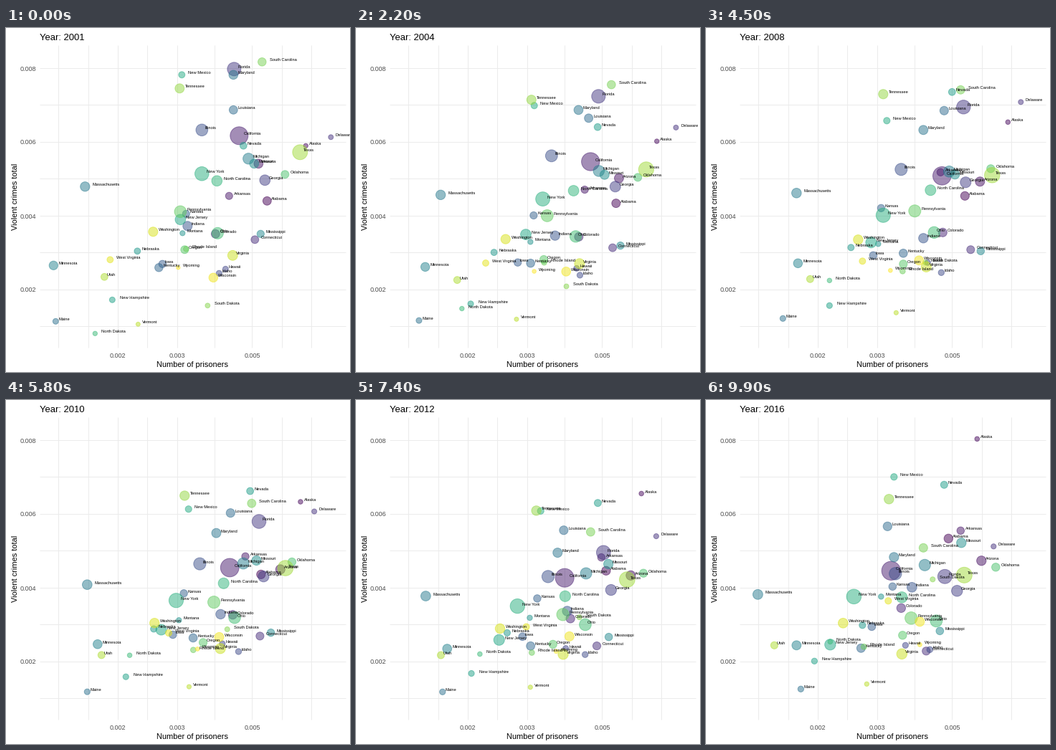
These frames come from a looping animation (480 by 480 pixels, 10000 ms). A matplotlib script:

```python
import numpy as np
import matplotlib.pyplot as plt
from matplotlib.animation import FuncAnimation

SIZE, DPI, FRAMES, STEP = 480, 72, 100, 100
LEFT, RIGHT, TOP, BOTTOM = 47, 474, 24, 446
GRID, TICK = "#EBEBEB", "#4D4D4D"
MIDDLE, LAST = 45, FRAMES - 1

plt.rcParams["font.family"] = "Liberation Sans"
names, people, paths = [], [], []


def state(name, millions, start, middle, end):
    """Register a bubble by its population and three points of its path."""
    names.append(name)
    people.append(millions)
    paths.append((start, middle, end))


state("Alabama", 4.5, (364, 241), (361, 234), (338, 193))
state("Alaska", .64, (418, 164), (421, 131), (378, 54))
state("Arizona", 5.6, (352, 189), (382, 214), (384, 224))
state("Arkansas", 2.7, (311, 234), (327, 201), (355, 182))
state("California", 34.5, (325, 150), (329, 206), (258, 238))
state("Colorado", 4.5, (292, 287), (330, 285), (272, 290))
state("Connecticut", 3.4, (347, 295), (369, 309), (307, 350))
state("Delaware", .8, (453, 152), (439, 103), (401, 204))
state("Florida", 17, (318, 57), (359, 110), (333, 246))
state("Georgia", 8.6, (361, 212), (362, 215), (350, 266))
state("Hawaii", 1.2, (306, 336), (309, 327), (278, 342))
state("Idaho", 1.35, (297, 342), (328, 341), (312, 348))
state("Illinois", 12, (273, 142), (272, 197), (264, 242))
state("Indiana", 6, (253, 276), (303, 293), (287, 261))
state("Iowa", 2.9, (218, 329), (233, 317), (231, 316))
state("Kansas", 2.7, (251, 259), (244, 251), (260, 260))
state("Kentucky", 4, (213, 334), (275, 314), (216, 346))
state("Louisiana", 4.4, (317, 114), (332, 115), (253, 176))
state("Maine", 1.25, (69, 409), (107, 405), (132, 403))
state("Maryland", 5.4, (317, 65), (303, 142), (262, 219))
state("Massachusetts", 6.3, (110, 221), (126, 230), (72, 271))
state("Michigan", 9.6, (338, 182), (339, 200), (305, 230))
state("Minnesota", 5, (66, 331), (128, 328), (126, 342))
state("Mississippi", 2.8, (355, 287), (383, 311), (326, 322))
state("Missouri", 5.6, (346, 189), (347, 204), (356, 199))
state("Montana", .91, (246, 286), (240, 301), (244, 274))
state("Nebraska", 1.7, (183, 311), (202, 306), (218, 314))
state("Nevada", 2.3, (331, 164), (343, 89), (332, 118))
state("New Hampshire", 1.24, (148, 379), (172, 387), (151, 364))
state("New Jersey", 8.3, (243, 267), (230, 299), (173, 341))
state("New Mexico", 1.8, (245, 65), (252, 129), (262, 107))
state("New York", 18.5, (273, 203), (247, 261), (206, 274))
state("North Carolina", 8.4, (294, 213), (313, 226), (273, 275))
state("North Dakota", .64, (124, 426), (172, 352), (173, 337))
state("Ohio", 10.9, (295, 286), (318, 285), (321, 308))
state("Oklahoma", 3.5, (389, 204), (397, 196), (404, 233))
state("Oregon", 3.5, (249, 309), (275, 329), (274, 328))
state("Pennsylvania", 12, (243, 256), (291, 255), (286, 304))
state("Rhode Island", 1.03, (251, 308), (274, 339), (220, 344))
state("South Carolina", 4.1, (357, 47), (355, 86), (303, 206))
state("South Dakota", .76, (281, 387), (306, 327), (316, 250))
state("Tennessee", 5.8, (242, 84), (247, 92), (255, 138))
state("Texas", 22, (410, 173), (399, 205), (360, 244))
state("Utah", 2.4, (137, 347), (145, 350), (95, 342))
state("Vermont", .56, (184, 413), (265, 397), (224, 396))
state("Virginia", 7.2, (316, 317), (307, 333), (273, 354))
state("Washington", 6, (205, 284), (212, 295), (191, 311))
state("West Virginia", 1.7, (145, 323), (218, 325), (254, 280))
state("Wisconsin", 5.3, (289, 348), (297, 324), (298, 309))
state("Wyoming", .5, (240, 334), (257, 338), (298, 341))

people = np.array(people)
start, middle, end = np.array(paths).transpose(1, 0, 2) + 0.3
GAP = names.index("New York")  # has no figures for 2014-2015

fig = plt.figure(figsize=(SIZE / DPI, SIZE / DPI), dpi=DPI, facecolor="white")
ax = fig.add_axes([0, 0, 1, 1])
ax.set(xlim=(0, SIZE), ylim=(SIZE, 0))
ax.axis("off")


def log_x(value):
    return 156 + 204.5 * np.log(value / 0.002)


# Grid: minor lines halfway between the major ones
major = [log_x(v) for v in (0.002, 0.003, 0.005)]
gap = major[1] - major[0]
major = [major[0] - gap, *major, major[-1] + gap]
minor = [(a + b) / 2 for a, b in zip(major, major[1:])]
ax.vlines(major + minor, TOP, BOTTOM, color=GRID, lw=1, zorder=0)
ax.hlines(55.5 + 51.5 * np.arange(8), LEFT, RIGHT, color=GRID, lw=1, zorder=0)

for x, value in zip(major[1:4], (2, 3, 5)):
    ax.text(x, 460, f"0.00{value}", size=9, color=TICK, ha="center")
for i, value in enumerate((8, 6, 4, 2)):
    ax.text(42.5, 59.5 + 103 * i, f"0.00{value}", size=9, color=TICK, ha="right")
ax.text(260, 473, "Number of prisoners", size=11, ha="center")
ax.text(13, 235, "Violent crimes total", size=11, rotation=90, ha="center", va="center")
title = ax.text(LEFT, 17, "", size=13)

colors = plt.get_cmap("viridis")(np.linspace(0, 1, len(names)))
colors[:, 3] = 0.5
dots = ax.scatter(people, people, c=colors, edgecolors=colors, linewidths=1, zorder=2)
labels = [ax.text(0, 0, name, size=5.8, zorder=3) for name in names]
shifts = [0.27 * label.get_window_extent().width for label in labels]


def locate(frame):
    """Straight legs, plus a nationwide dip in crime that scales with its level."""
    if frame < MIDDLE:
        a, b, u, depth = start, middle, frame / MIDDLE, 0.035
    else:
        a, b, u, depth = middle, end, (frame - MIDDLE) / (LAST - MIDDLE), 0.12
    spots = a + (b - a) * u
    dip = depth * max(0, np.sin(np.pi * u)) ** 0.7
    spots[:, 1] += dip * np.maximum(0, 430 - spots[:, 1])
    return spots


def draw(frame):
    u = frame / LAST
    year = 2001 + 15 * u
    title.set_text(f"Year: {round(year)}")

    spots = locate(frame)
    for label, shift, (x, y) in zip(labels, shifts, spots):
        label.set_position((x + shift, y - 1))
    hidden = 2014 < year < 2015
    labels[GAP].set_visible(not hidden)
    if hidden:
        spots[GAP] = np.nan

    share = np.clip((people * (1 + 0.14 * u) - 0.49) / 38.8, 0, 1)
    radius = 0.375 * (2.845 * (2 + 10 * np.sqrt(share)) + 0.94)
    dots.set_offsets(spots)
    dots.set_sizes((2 * radius) ** 2)
    return [title, dots, *labels]


anim = FuncAnimation(fig, draw, frames=FRAMES, interval=STEP, repeat=True, repeat_delay=0)
plt.show()
```
